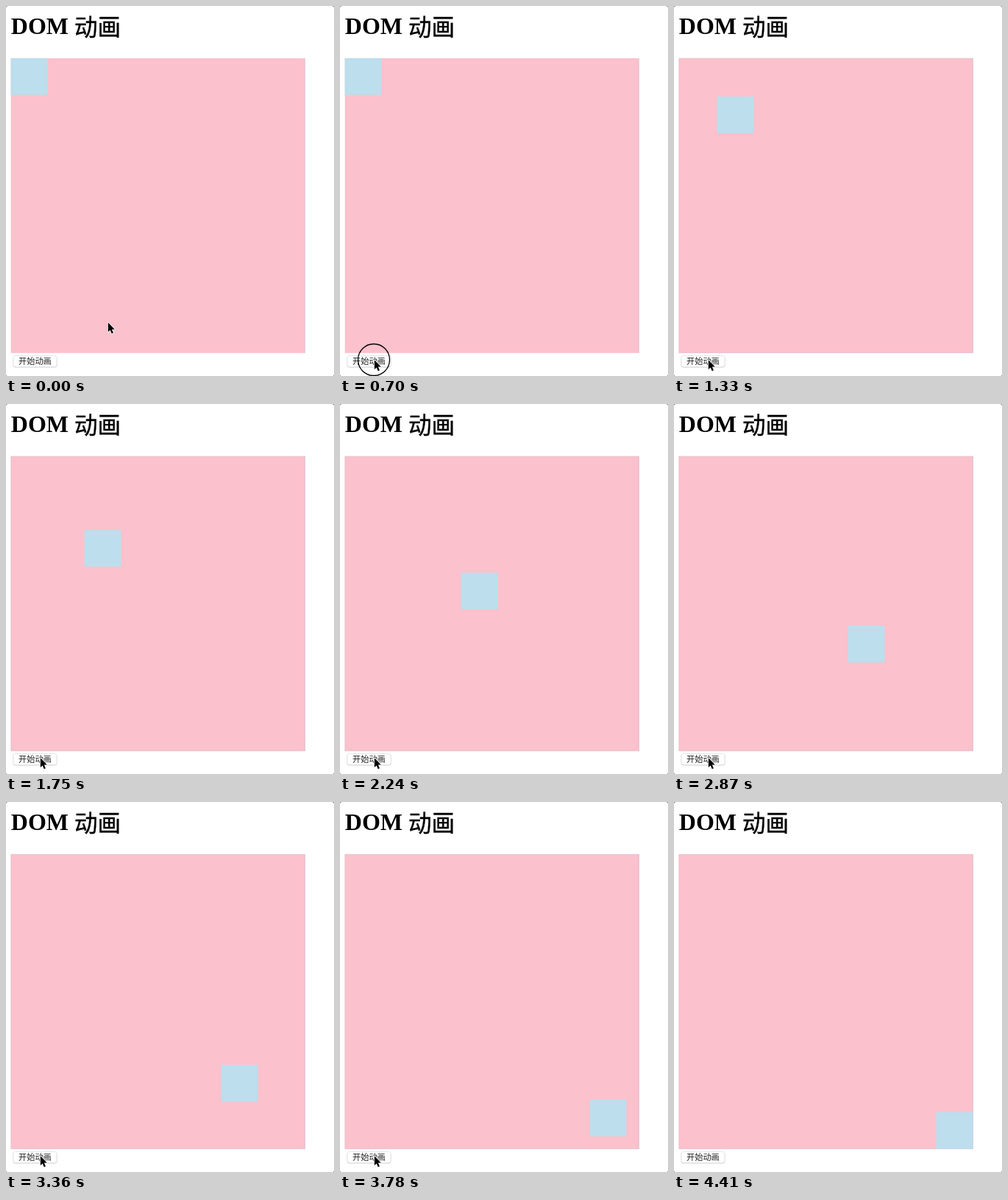
Animation of 446x502 px, one loop 4830 ms. Source, as an HTML page:

```html
<!DOCTYPE html>
<html lang="zh">
<head>
<meta charset="utf-8">
<title>DOM 动画</title>
<style>
  html, body { margin: 0; width: 100%; height: 100%; overflow: hidden; background: #fff; }
  svg { display: block; width: 446px; height: 502px; }
  .title { font: bold 32px "Liberation Serif", serif; }
  .title .han { font: 31.5px "Noto Sans CJK SC", "Noto Sans CJK", sans-serif; stroke: #000; stroke-width: .4; }
  .label { font: 11.2px "Noto Sans CJK SC", "Noto Sans CJK", sans-serif; fill: #222; }
</style>
</head>
<body>
<svg viewBox="0 0 446 502">
  <path d="M0 0H2L0 2ZM446 0H444L446 2ZM0 502H1.5L0 500.5ZM446 502H444.5L446 500.5Z" fill="#888"/>
  <text class="title" x="6.8" y="38">DOM <tspan class="han" dy="2">动画</tspan></text>

  <rect x="6.6" y="70.8" width="400" height="400" fill="#fbc1cc"/>
  <path d="M406.5 71V471" stroke="#d4ccd2" stroke-opacity=".8"/>
  <rect id="edge" x="7" y="71.2" width="399.4" height="399.4" fill="none" stroke="#d8c4ca" stroke-opacity=".6"/>
  <rect id="box" x="6.6" y="70.8" width="49.8" height="49.8" fill="#bcdeed"/>

  <rect x="9.5" y="474.6" width="60" height="16" rx="3.5" fill="#cfcfcf"/>
  <rect x="10" y="474.4" width="59" height="15.2" rx="3" fill="#fff" stroke="#e2e2e2" stroke-width=".7"/>
  <text class="label" x="17" y="486.3">开始动画</text>

  <g id="cursor">
    <path d="M0 0V12.8L2.9 10.2L4.9 14.9L7.1 13.9L5.1 9.3H9Z"
          fill="#000" stroke="#fff" stroke-width="1.6" stroke-linejoin="round" paint-order="stroke"/>
  </g>
  <circle id="click" cx="46" cy="480" r="21.5" fill="none" stroke="#000" stroke-width="1.3"/>
</svg>
<script>
  const LOOP = 4830, STEP = 70;
  const $ = id => document.getElementById(id);
  const box = $("box"), edge = $("edge"), cursor = $("cursor"), click = $("click");

  // [time, diagonal offset]
  const slide = [[884, 0], [1190, 35], [1330, 52], [1750, 100], [2240, 158],
                 [2310, 165], [2870, 230], [3360, 286], [3430, 291], [3920, 350]];

  const REST = [138.8, 429.5], BUTTON = [46.8, 480.3], EXIT = [122, 503];

  const clamp = p => Math.min(1, Math.max(0, p));
  const ease = p => p * p * (3 - 2 * p);
  const mix = (a, b, p) => a + (b - a) * p;
  const show = (el, on) => el.setAttribute("visibility", on ? "visible" : "hidden");

  function offsetAt(t) {
    let [t0, v0] = slide[0];
    for (const [t1, v1] of slide) {
      if (t <= t1) return t1 > t0 ? mix(v0, v1, clamp((t - t0) / (t1 - t0))) : v1;
      [t0, v0] = [t1, v1];
    }
    return v0;
  }

  function cursorAt(t) {
    const leaving = t > 3990;
    const [from, to] = leaving ? [BUTTON, EXIT] : [REST, BUTTON];
    const p = leaving ? clamp((t - 3990) / 420) ** 1.5 : ease(clamp(t / 490));
    return from.map((v, i) => mix(v, to[i], p));
  }

  function draw(time) {
    const t = Math.floor((time % LOOP) / STEP) * STEP;
    const d = Math.round(offsetAt(t));
    box.setAttribute("transform", `translate(${d} ${d})`);
    cursor.setAttribute("transform", `translate(${cursorAt(t).join(" ")})`);
    show(edge, t > 884);
    show(cursor, t < 4410);
    show(click, t >= 700 && t < 840);
  }

  const start = performance.now();
  function tick() {
    draw(performance.now() - start);
    requestAnimationFrame(tick);
  }
  tick();
</script>
</body>
</html>
```
